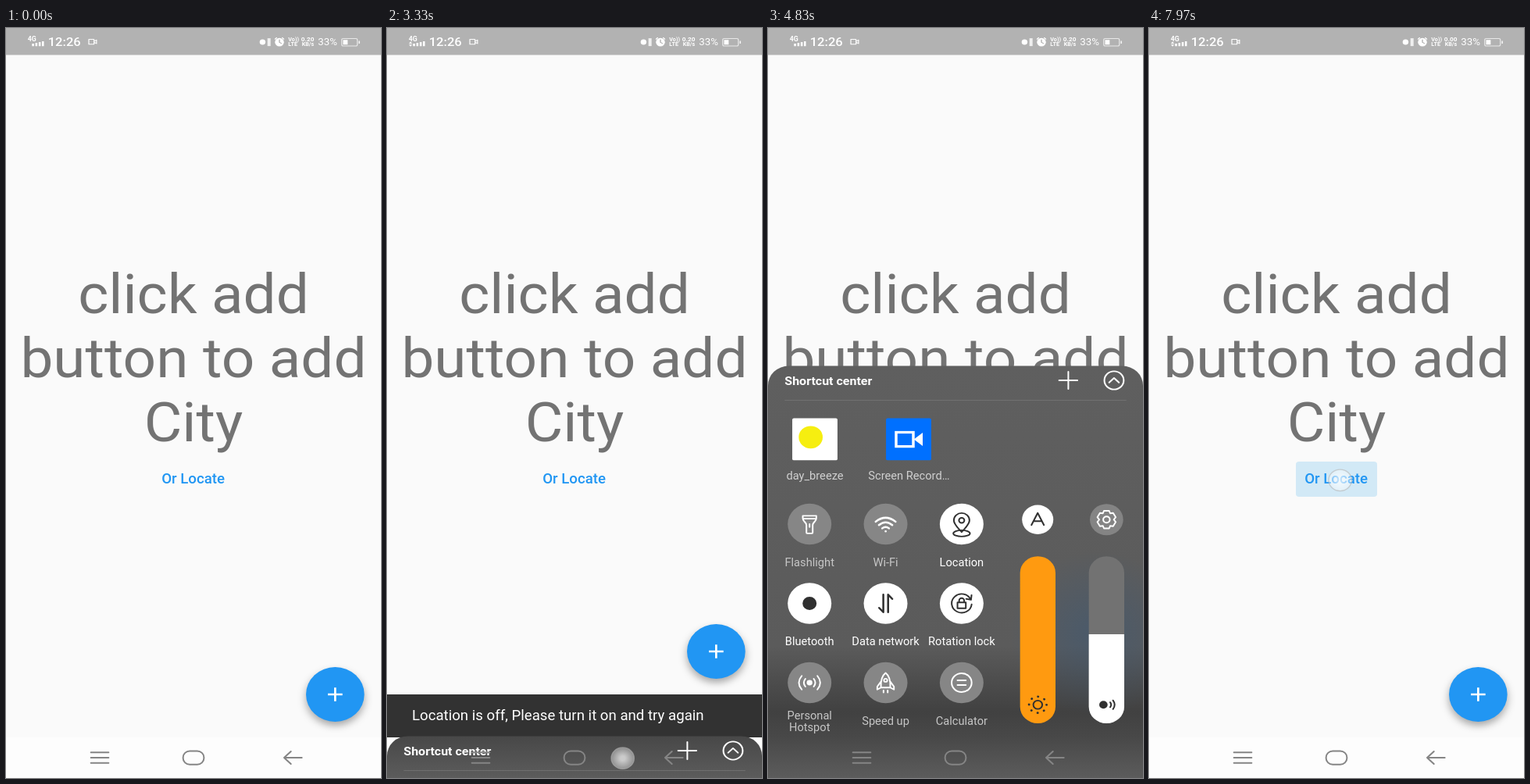
An HTML page for the animation above (8 s loop, 480x960 px).

```html
<!DOCTYPE html>
<html lang="en">
<head>
<meta charset="utf-8">
<title>Weather app screen</title>
<style>
html, body { margin: 0; height: 100%; overflow: hidden; background: #fafafa; }
svg { display: block; width: 100vw; height: 100vh; font-family: Roboto, sans-serif; }
.mid { text-anchor: middle; }
.line { fill: none; stroke: currentColor; stroke-width: 1.5; stroke-linecap: round; stroke-linejoin: round; }
.label { font-size: 11px; text-anchor: middle; }
#fab { filter: drop-shadow(0 4px 4px #0005); }
#status .line { stroke-width: .9; }
</style>
</head>
<body>
<!-- Drawn in device units: 360 x 768 on a 480 x 960 stage -->
<svg viewBox="0 0 360 768" preserveAspectRatio="none">
  <defs>
    <linearGradient id="blur" gradientUnits="userSpaceOnUse" x1="0" y1="346" x2="0" y2="768">
      <stop offset="0" stop-color="#5f5f5f"/>
      <stop offset=".68" stop-color="#5b5b5b"/>
      <stop offset=".77" stop-color="#4c4c4c"/>
      <stop offset=".84" stop-color="#414141"/>
      <stop offset=".9" stop-color="#484848"/>
      <stop offset="1" stop-color="#5c5c5c"/>
    </linearGradient>
    <radialGradient id="tint" gradientUnits="userSpaceOnUse" cx="316" cy="620" r="84">
      <stop offset="0" stop-color="#38587a" stop-opacity=".5"/>
      <stop offset="1" stop-color="#38587a" stop-opacity="0"/>
    </radialGradient>
    <radialGradient id="dot">
      <stop offset=".2" stop-color="#fff" stop-opacity=".7"/>
      <stop offset="1" stop-color="#fff" stop-opacity=".35"/>
    </radialGradient>
  </defs>
  <rect width="360" height="768" fill="#fafafa"/>
  <g class="mid" font-size="56" fill="#737373">
    <text x="180" y="292">click add</text>
    <text x="180" y="357.6">button to add</text>
    <text x="180" y="423.2">City</text>
  </g>
  <rect id="highlight" x="141" y="444" width="78" height="36" rx="3" fill="#d2e9f6"/>
  <text class="mid" x="179.7" y="466.4" font-size="14" font-weight="500" fill="#2196f3">Or Locate</text>

  <g id="fab">
    <circle cx="316" cy="682.4" r="28" fill="#2196f3"/>
    <path d="M309 682.4h14m-7-7v14" stroke="#fff" stroke-width="2"/>
  </g>
  <g id="snackbar">
    <rect y="682.4" width="360" height="44" fill="#323232"/>
    <text x="24" y="709.2" font-size="14" fill="#fff">Location is off, Please turn it on and try again</text>
  </g>
  <rect y="726.4" width="360" height="42" fill="#fdfdfd"/>

  <rect class="sheet" width="360" height="460" rx="20" fill="url(#blur)"/>
  <rect class="sheet" width="360" height="460" rx="20" fill="url(#tint)"/>
  <g id="content" color="#fff">
    <text x="16" y="365.6" font-size="12" font-weight="700" fill="#fff">Shortcut center</text>
    <path class="line" d="M279.5 360.8h17.5m-8.7-8.8v17.6M327.5 363l4.7-4.6 4.7 4.6"/>
    <circle class="line" cx="332.2" cy="360.8" r="9.3"/>
    <path d="M16 381.2H344" stroke="#747474" stroke-width=".7"/>
    <rect x="23.3" y="399.6" width="43.4" height="43" rx="1.5" fill="#fff"/>
    <circle cx="41" cy="419" r="11.5" fill="#f6ee10"/>
    <rect x="113.3" y="399.6" width="43.4" height="43" rx="1.5" fill="#0070ff"/>
    <rect x="123" y="414" width="16.5" height="14.5" fill="none" stroke="#fff" stroke-width="2.6"/>
    <path d="M140 421.2l8.5-6.8v13.6z" fill="#fff"/>
    <g class="label" fill="#d0d0d0">
      <text x="45" y="462.8">day_breeze</text>
      <text x="135.3" y="462.8">Screen Record…</text>
    </g>
    <g id="toggles"></g>

    <circle cx="258.9" cy="503.4" r="15" fill="#fff"/>
    <path class="line" color="#303030" d="M252.9 509l6-12.4 6 12.4m-10-4h8"/>
    <circle cx="325" cy="503.4" r="16" fill="#848484"/>
    <g class="line" transform="translate(325 503.4)">
      <path d="M-2.5-9h5l1 2.6 2.8-.4 2.5 4.3L7 0l1.8 2.5-2.5 4.3-2.8-.4-1 2.6h-5l-1-2.6-2.8.4-2.5-4.3L-7 0l-1.8-2.5 2.5-4.3 2.8.4z"/>
      <circle r="3.2"/>
    </g>
    <rect x="242" y="541" width="34" height="171" rx="17" fill="#ff9a10"/>
    <g class="line" color="#303030" transform="translate(259 693)">
      <circle r="4.3"/><circle r="8.4" stroke-width="2.2" stroke-dasharray=".1 6.497"/>
    </g>
    <rect x="308" y="541" width="34" height="171" rx="17" fill="#727272"/>
    <path d="M308 620.8h34V695a17 17 0 0 1-34 0z" fill="#fff"/>
    <g color="#303030" transform="translate(325 693)">
      <circle cx="-3" r="4" fill="currentColor"/>
      <path class="line" d="M3.5-2.5q1.8 2.5 0 5M6.2-4.5q3.2 4.5 0 9"/>
    </g>
  </g>

  <g class="line" color="#858585">
    <path d="M81.5 741.8h17m-17 5.4h17m-17 5.4h17M284 747.2h-17l6.5-6.4m-6.5 6.4l6.5 6.4"/>
    <rect x="170" y="740.4" width="20" height="13.8" rx="6.4"/>
  </g>

  <rect width="360" height="27.6" fill="#b2b2b2"/>
  <g id="status" fill="#fff" color="#fff">
    <text x="20.8" y="14" font-size="6.6" font-weight="700">4G</text>
    <path id="data" d="M21 16l1.6-2 1.6 2zm0 1l1.6 2 1.6-2z"/>
    <path d="M25 18.6v-2.6h1.9v2.6zm3.2 0v-3.4h1.9v3.4zm3.2 0v-4.2h1.9v4.2zm3.1 0v-5h1.9v5z"/>
    <text x="40.3" y="18.6" font-size="12.4" font-weight="500">12:26</text>
    <path class="line" d="M79.5 11.6h5v5h-5zm5 2l2.4-1.3v3.6l-2.4-1.3"/>
    <circle cx="246.3" cy="14.4" r="2.8"/>
    <path d="M251 10.5h3v8h-3z" opacity=".8"/>
    <circle cx="262.5" cy="14.5" r="4.3"/>
    <path class="line" d="M258.3 11.4l1.5-1.4m6.9 1.4l-1.5-1.4"/>
    <path class="line" color="#a8a8a8" d="M262.5 12v2.7l1.8 1"/>
    <g font-size="5.4" font-weight="700">
      <text x="271" y="13.6">Vo))</text><text x="271" y="18.6">LTE</text>
      <text id="speed" x="283.4" y="13.6" font-size="6.2"></text><text x="284" y="18.6">KB/s</text>
    </g>
    <text x="299.4" y="18" font-size="10">33%</text>
    <rect class="line" x="322.3" y="10.8" width="15" height="7.6" rx="1.5" opacity=".7"/>
    <path d="M323.6 12.2h4.4v4.8h-4.4zm15 1h1v2.8h-1z"/>
  </g>
  <circle id="touch" r="11" fill="url(#dot)" stroke="#b4b4b4" stroke-opacity=".6"/>
</svg>
<script>
const $ = id => document.getElementById(id);
const LOOP = 8000, SHEET_TOP = 346, SHEET_HEIGHT = 422;
const ON = { disc: '#fff', icon: '#303030', label: '#fff' };
const OFF = { disc: '#868686', icon: '#fff', label: '#c6c6c6' };
const pinShape = '<path d="M0 10C-4 5-7.5 2-7.5-2A7.5 7.5 0 0 1 7.5-2C7.5 2 4 5 0 10Z"/><circle cy="-2" r="2.6"/>';

// label, icon markup, switched on
const toggles = [
  ['Flashlight', '<path d="M-6.5-8.5H6.5V-6C6.5-2.5 3-2 3 1V8.5Q3 9.5 2 9.5H-2Q-3 9.5-3 8.5V1C-3-2-6.5-2.5-6.5-6ZM-6-5.5H6M0 0V3"/>', 0],
  ['Wi-Fi', '<path stroke-width="2" d="M-9.5-2.5Q0-10.5 9.5-2.5M-6.4 1Q0-4.6 6.4 1M-3.2 4.3Q0 1.6 3.2 4.3M0 7.3h.1"/>', 0],
  ['Location', `<g id="pin">${pinShape}</g><ellipse id="base" cy="9.5" rx="8" ry="3.2"/>`, 0],
  ['Bluetooth', '<circle r="6" fill="currentColor"/>', 1],
  ['Data network', '<path stroke-width="1.9" d="M-2.2-9V9L-6.2 4.6M2.4 9V-9L6.4-4.6"/>', 1],
  ['Rotation lock', '<path d="M8.8-4A9.6 9.6 0 1 0 9.6 1M9.5-8.5L9-3.7 4.4-4.6M-4-1H4V5H-4ZM-2.4-1V-3A2.4 2.4 0 0 1 2.4-3V-1"/>', 1],
  ['Personal Hotspot', '<circle r="2" fill="currentColor"/><path d="M-4-4Q-7 0-4 4M4-4Q7 0 4 4M-7.5-7Q-13 0-7.5 7M7.5-7Q13 0 7.5 7"/>', 0],
  ['Speed up', '<path d="M0-10Q-5-6-4.5 5H4.5Q5-6 0-10ZM-4.6-1L-8 4V7L-4.5 5M4.6-1L8 4V7L4.5 5M-2 8V10M2 8V10"/><circle cy="-2.5" r="1.6"/>', 0],
  ['Calculator', '<circle r="9.6"/><path d="M-4-2.4H4M-4 2.4H4"/>', 0],
];
$('toggles').innerHTML = toggles.map(([label, icon, on], i) => {
  const x = 39.9 + 73 * (i % 3), y = 508 + 81.2 * Math.floor(i / 3);
  const look = on ? ON : OFF;
  const lines = label.startsWith('Personal') ? label.split(' ') : [label];
  const text = lines.map((s, k) =>
    `<text y="${lines.length > 1 ? 37.4 + 12.4 * k : 43.2}">${s}</text>`).join('');
  return `<g class="toggle" transform="translate(${x} ${y})">
    <circle r="21" fill="${look.disc}"/>
    <g class="line" color="${look.icon}">${icon}</g>
    <g class="label" fill="${look.label}">${text}</g></g>`;
}).join('');
const [disc, pinIcon, pinLabel] = document.querySelectorAll('.toggle')[2].children;
const sheets = document.querySelectorAll('.sheet');

// start, end, x and y at start, x and y at end
const touches = [
  [900, 1350, 183, 463, 183, 463],
  [3300, 3900, 225, 765, 249.8, 431],
  [4200, 4450, 186, 508, 186, 508],
  [5970, 6300, 256, 470, 261.8, 635.6],
  [6800, 7600, 111, 481, 183.5, 463],
  [7600, 8000, 183.5, 463, 183.5, 463],
];

const ramp = (t, a, b) => Math.min(1, Math.max(0, (t - a) / (b - a)));
const smooth = p => p * p * (3 - 2 * p);
const move = (el, y) => el.setAttribute('transform', `translate(0 ${y})`);
const show = (el, on) => el.style.display = on ? '' : 'none';

function draw(t) {
  $('highlight').style.opacity =
    ramp(t, 1000, 1150) - ramp(t, 1400, 1700) + ramp(t, 7640, 7840);

  const bar = smooth(ramp(t, 1400, 1650)) - smooth(ramp(t, 5600, 5700));
  move($('fab'), -44 * bar);
  move($('snackbar'), 44 * (1 - bar));
  show($('snackbar'), bar > 0);

  const opened = 1 - (1 - ramp(t, 3300, 3970)) ** 2.26;
  const closed = ramp(t, 5970, 6370) ** 1.87;
  const drop = SHEET_HEIGHT * (1 - opened + closed);
  sheets.forEach(s => s.setAttribute('y', SHEET_TOP + drop));
  move($('content'), drop);

  const located = t >= 4480, bouncing = located && t < 5070;
  const look = located ? ON : OFF;
  disc.setAttribute('fill', look.disc);
  pinIcon.setAttribute('color', look.icon);
  pinLabel.setAttribute('fill', look.label);
  move($('pin'), bouncing ? -1.8 - 3 * Math.sin(Math.PI * ramp(t, 4480, 4800)) : 0);
  show($('base'), bouncing);

  $('speed').textContent = t < 5300 ? '0.20' : '0.00';
  show($('data'), (t >= 870 && t < 4200) || t >= 6600);

  const touch = touches.find(([a, b]) => t >= a && t < b);
  show($('touch'), touch);
  if (touch) {
    const [a, b, x0, y0, x1, y1] = touch, p = ramp(t, a, b);
    $('touch').setAttribute('cx', x0 + (x1 - x0) * p);
    $('touch').setAttribute('cy', y0 + (y1 - y0) * p);
  }
}

function frame() {
  draw(performance.now() % LOOP);
  requestAnimationFrame(frame);
}
frame();
</script>
</body>
</html>
```
